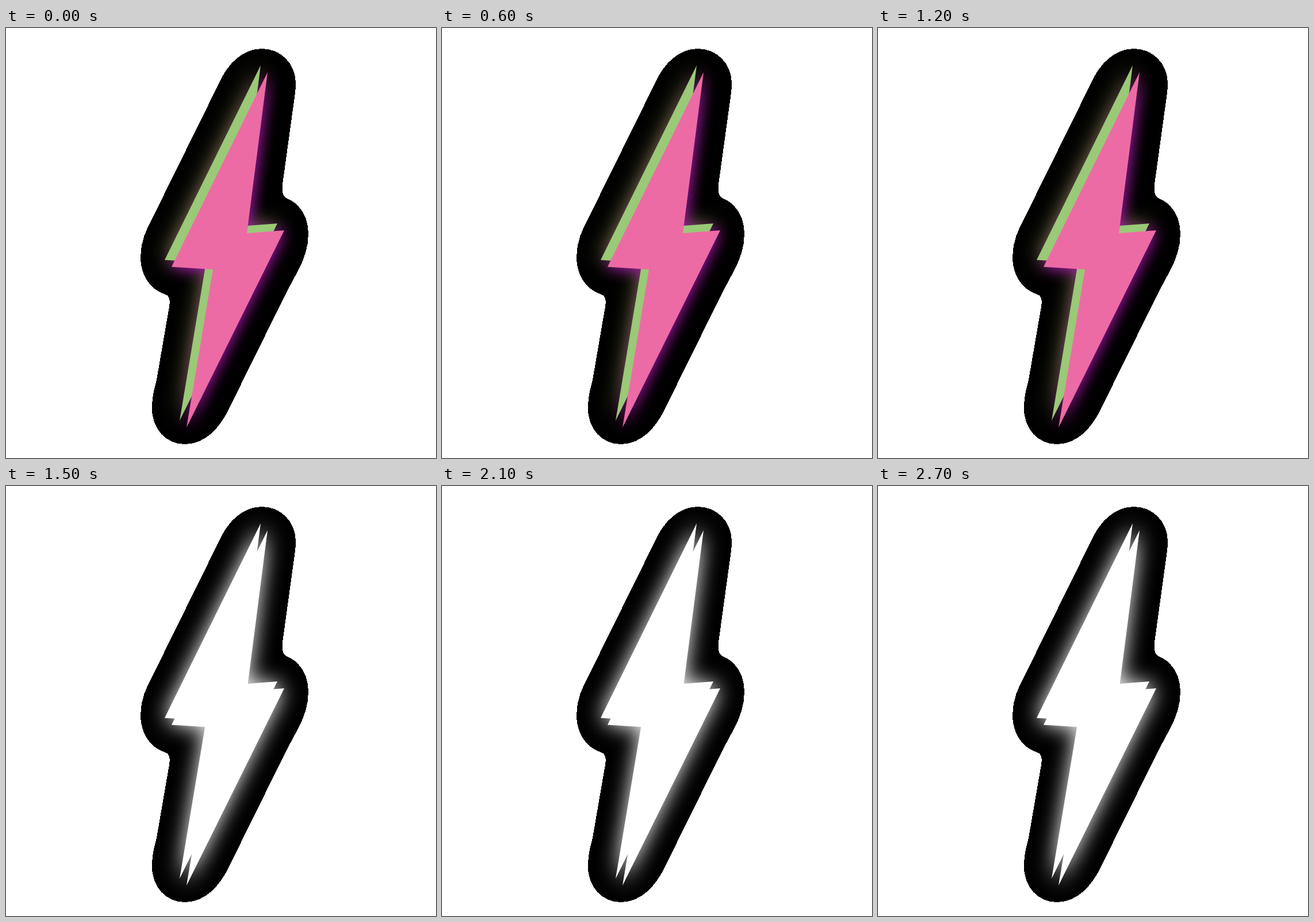
An HTML page that plays this animation: 748x748 px, repeating every 2970 ms.

```html
<!DOCTYPE html>
<html>
<head>
<meta charset="utf-8">
<style>
  html, body { margin: 0; width: 100%; height: 100%; overflow: hidden; background: #fff; }
  svg { display: block; width: 100vw; height: 100vh; }
  .wide { filter: blur(18px); }
  .tight { filter: blur(14px); }
</style>
</head>
<body>
<svg viewBox="0 0 748 748">
  <defs>
    <path id="halo" d="M445 36C478 36 504 62 504 96C504 106 503 112 502 120L481 272
      C480 285 481 292 488 296C513 306 526 330 526 358C526 382 518 404 507 424
      C498 441 490 455 473 490L388 662C372 696 346 724 311 724C279 724 254 698 254 662
      C254 640 258 628 262 612L282 496C286 478 287 466 276 463C251 455 234 430 234 398
      C234 372 244 350 256 328L372 93C386 62 412 36 445 36Z"/>
    <path id="bolt" d="M455 77L419 357L484 352L314 695L360 420L288 415.500Z"/>
    <g id="pair">
      <use href="#bolt" x="-12" y="-12"/>
      <use href="#bolt"/>
    </g>
    <clipPath id="clip"><use href="#halo"/></clipPath>
  </defs>
  <use href="#halo" shape-rendering="crispEdges"/>
  <g id="neon" clip-path="url(#clip)">
    <g class="wide"><use href="#bolt" x="-12" y="-12" fill="#7a8048"/></g>
    <g class="tight"><use href="#bolt" fill="#b400c4"/></g>
    <use href="#bolt" x="-12" y="-12" fill="#9ac977"/>
    <use href="#bolt" fill="#ed6ba5"/>
  </g>
  <g id="flash" clip-path="url(#clip)" fill="#fff" visibility="hidden">
    <g class="wide"><use href="#pair"/></g>
    <use href="#pair"/>
  </g>
</svg>
<script>
  const LOOP = 2970, STEP = 300;
  const neon = document.getElementById('neon');
  const flash = document.getElementById('flash');
  const start = performance.now();
  const show = (el, on) => el.setAttribute('visibility', on ? 'visible' : 'hidden');

  function draw() {
    const t = (performance.now() - start) % LOOP;
    const lit = Math.floor(t / STEP) % 2 === 1;
    show(neon, !lit);
    show(flash, lit);
    requestAnimationFrame(draw);
  }
  draw();
</script>
</body>
</html>
```
